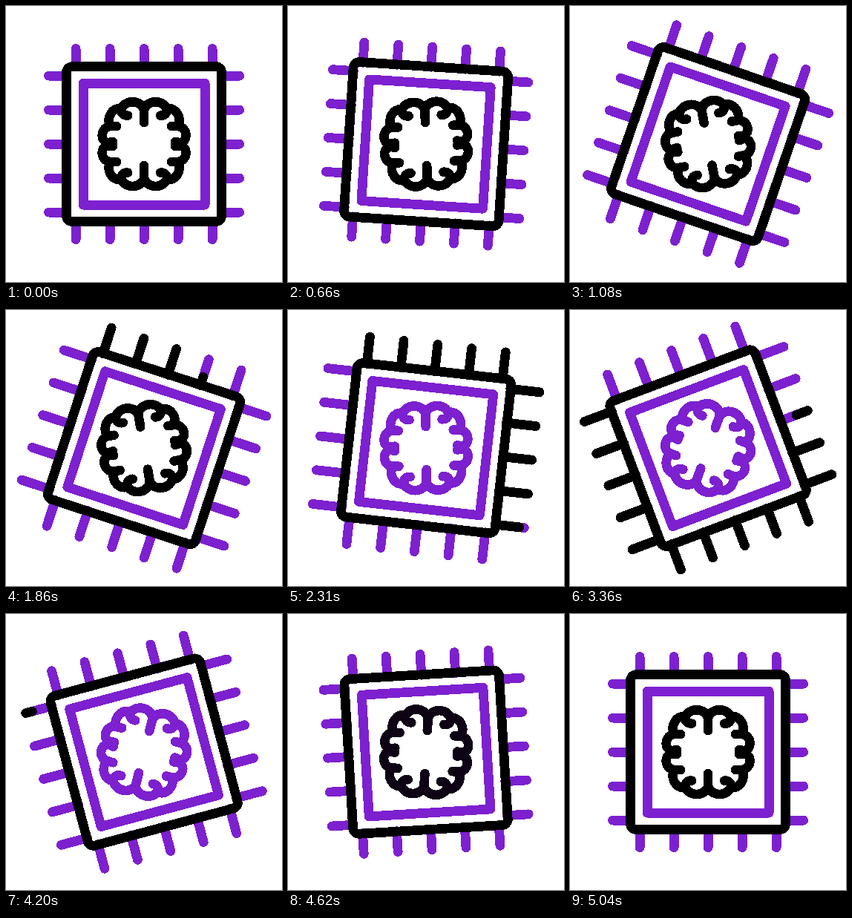
Animation, 372 px wide and 372 px high, one loop 5.4 s. Source, as an HTML page:

```html
<!DOCTYPE html>
<html lang="en">
<head>
<meta charset="utf-8">
<title>AI chip</title>
<style>
  html, body { margin: 0; width: 100%; height: 100%; overflow: hidden; background: #fff; }
  svg { display: block; width: 100vw; height: 100vh; }
</style>
</head>
<body>
<svg viewBox="0 0 372 372" fill="none" stroke-linecap="round" stroke-linejoin="round" shape-rendering="crispEdges">
  <defs>
    <path id="lobes" d="M0 -29 V-46 A15.8 13.5 0 0 0 -31 -46 Q-30 -38 -22 -38.5
      M-31 -48 C-42 -49 -51 -38 -46 -24 L-37 -24
      M-46 -24 C-59 -22 -60 -3 -48 -2 L-42 -3"/>
    <g id="half"><use href="#lobes"/><use href="#lobes" transform="scale(1 -1)"/></g>
  </defs>
  <g transform="translate(186.1 186.1)">
    <g id="chip" stroke-width="12.8">
      <g id="pins"></g>
      <rect x="-104.5" y="-104.5" width="209" height="209" rx="8" stroke="#000"/>
      <rect x="-82" y="-82" width="164" height="164" stroke="#7d20d0"/>
    </g>
    <g id="brain" stroke-width="12.6">
      <use href="#half"/><use href="#half" transform="scale(-1 1)"/>
    </g>
  </g>
</svg>
<script>
const LOOP = 5400, PURPLE = [125, 32, 208];
const BASE = 104, TIP = 128.5, GAP = 46, PIN_MS = 69;
const FILL_AT = 1632, CLEAR_AT = 2838;

const $ = id => document.getElementById(id);
const clamp = v => Math.min(1, Math.max(0, v));
const ease = (t, a, b) => {
  const k = clamp((t - a) / (b - a));
  return k * k * (3 - 2 * k);
};
// from rest to one angle, over to the other, back to rest
const swing = (t, first, second) =>
  first * ease(t, 450, 1235) +
  (second - first) * ease(t, 1550, 3470) -
  second * ease(t, 3820, 4900);

function addLine(parent, color) {
  const line = document.createElementNS('http://www.w3.org/2000/svg', 'path');
  line.setAttribute('stroke', color);
  parent.append(line);
  return line;
}

// Pins run clockwise from the top left; each side is the top row turned.
const pins = Array.from({ length: 20 }, (_, i) => {
  const g = document.createElementNS('http://www.w3.org/2000/svg', 'g');
  g.setAttribute('transform', `rotate(${90 * Math.floor(i / 5)}) translate(${(i % 5 - 2) * GAP} 0)`);
  $('pins').append(g);
  return { base: addLine(g, `rgb(${PURPLE})`), ink: addLine(g, '#000') };
});

function drawPin(pin, i, t, grow) {
  const tip = TIP + grow * (Math.floor(i / 5) % 2 ? 15 : 12);
  const at = k => -(BASE + (tip - BASE) * k);
  const end = clamp((t - FILL_AT) / PIN_MS - i);
  const start = clamp((t - CLEAR_AT) / PIN_MS - i);
  pin.base.setAttribute('d', `M0 ${at(0)}V${at(1)}`);
  pin.ink.setAttribute('d', end > start ? `M0 ${at(start)}V${at(end)}` : '');
}

function draw(t) {
  const grow = ease(t, 320, 1400) - ease(t, 3850, 5040);
  const tint = ease(t, 1900, 2280) - ease(t, 4300, 4700);

  $('chip').setAttribute('transform', `rotate(${swing(t, 21, -21)})`);
  $('brain').setAttribute('transform', `rotate(${swing(t, -12, 20)})`);
  $('brain').setAttribute('stroke', `rgb(${PURPLE.map(c => Math.round(c * tint))})`);
  pins.forEach((pin, i) => drawPin(pin, i, t, grow));
}

const began = performance.now();
function tick() {
  draw((performance.now() - began) % LOOP);
  requestAnimationFrame(tick);
}
tick();
</script>
</body>
</html>
```
